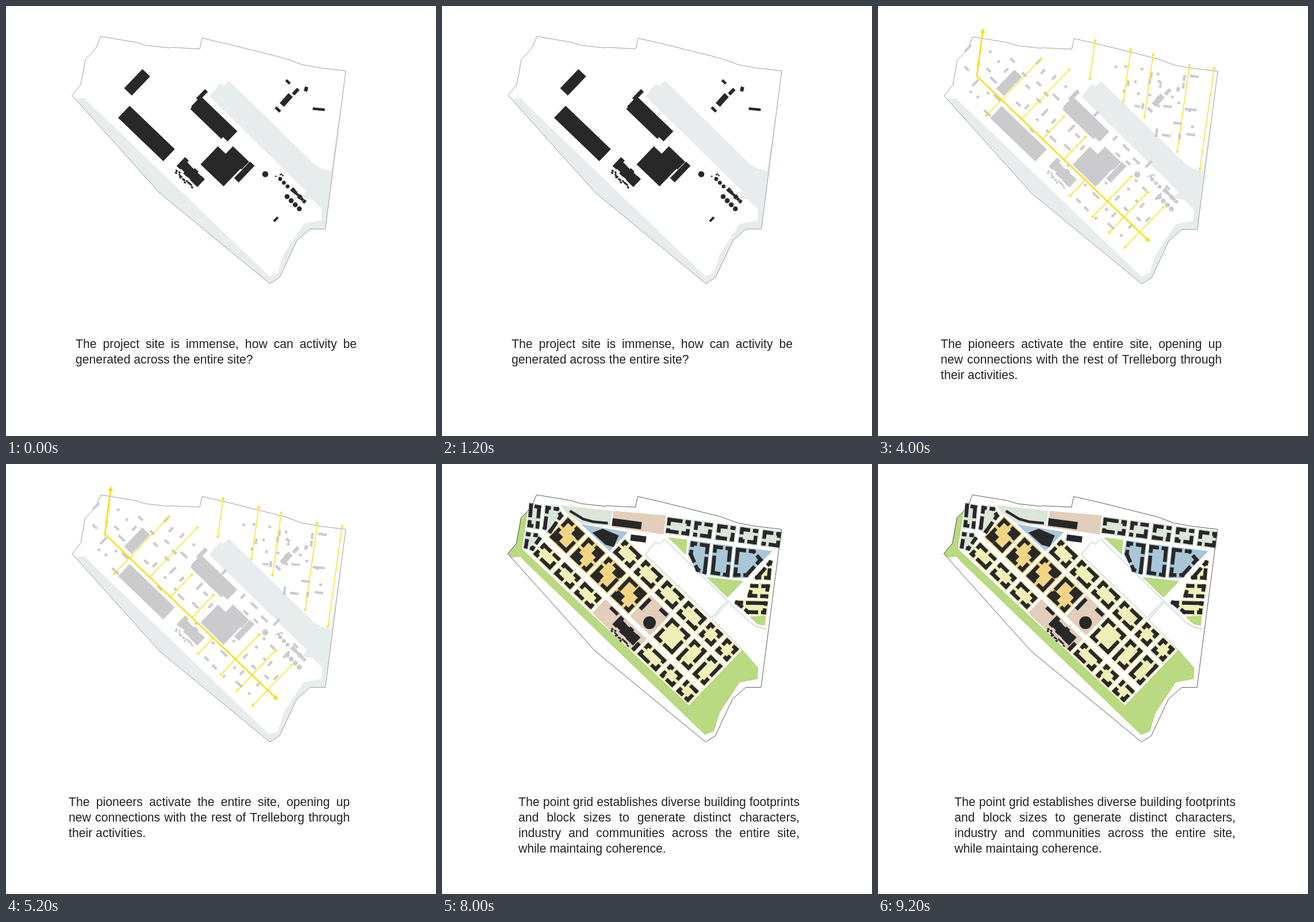
These frames come from a looping animation (748 px wide and 748 px high, 10000 ms). An HTML page with a canvas:

```html
<!DOCTYPE html>
<html lang="en">
<head>
<meta charset="utf-8">
<title>Site development</title>
<style>
html, body { margin: 0; width: 100%; height: 100%; overflow: hidden; background: #fff; }
canvas { display: block; width: 748px; height: 748px; }
</style>
</head>
<body>
<canvas id="stage" width="748" height="748"></canvas>
<script>
const ctx = document.getElementById('stage').getContext('2d');
const RAD = Math.PI / 180;
const AXIS = { x: 172, y: 121.5, deg: 43.83 };
const FLAT = { x: 394, y: 105, deg: 7.5 };
const INK = '#282828', GREY = '#cbcbcd', YELLOW = '#ffdc00';

let seed = 1;
function rand() {
  seed = (seed * 16807) % 2147483647;
  return seed / 2147483647;
}
const pick = list => list[Math.floor(rand() * list.length)];

function trace(pts) {
  ctx.beginPath();
  for (let i = 0; i < pts.length; i += 2) ctx.lineTo(pts[i], pts[i + 1]);
}

function poly(pts, fill, stroke, width = 0.8) {
  trace(pts);
  ctx.closePath();
  if (fill) { ctx.fillStyle = fill; ctx.fill(); }
  if (stroke) { ctx.strokeStyle = stroke; ctx.lineWidth = width; ctx.stroke(); }
}

function line(pts, color, width) {
  trace(pts);
  ctx.strokeStyle = color;
  ctx.lineWidth = width;
  ctx.stroke();
}

function within({ x, y, deg }, draw) {
  ctx.save();
  ctx.translate(x, y);
  ctx.rotate(deg * RAD);
  draw();
  ctx.restore();
}

function toStage({ x, y, deg }, u, v) {
  const c = Math.cos(deg * RAD), s = Math.sin(deg * RAD);
  return [x + u * c - v * s, y + u * s + v * c];
}

const rect = (x, y, w, h) => [x - w / 2, y - h / 2, x + w / 2, y - h / 2, x + w / 2, y + h / 2, x - w / 2, y + h / 2];
const box = (x, y, w, h, fill, deg = 0) => within({ x, y, deg }, () => poly(rect(0, 0, w, h), fill));

function disc(x, y, r, fill) {
  ctx.beginPath();
  ctx.arc(x, y, r, 0, 7);
  ctx.fillStyle = fill;
  ctx.fill();
}

// Terrain
const border = [165,53, 225,63, 243,68.5, 284,73, 286,72, 337,74.5, 341,56, 385,66, 485,91, 515,102,
  545,107.5, 591,113, 555.5,388, 529,388, 506,408, 476,472, 459,483, 267,325, 115,155.5, 130,137,
  138,93, 149,82, 157,72];
const shore = [115,155.5, 122,161.5, 137,160, 146,170, 458,470, 473,464, 483,432, 518,379, 549,373, 550,354];
const dock = [354,157, 372,135, 378,139, 388,130];
const inlet = [535,274, 547,282, 565,287];
const coast = [...shore, 533,337, 514,334, 523,323, ...dock, ...inlet, 583,168, ...border.slice(24, 38)];
const park = [...shore, 523,323, 430,420, 139,147, 149,82, 138,93, 130,137];

function terrain(water, edge) {
  if (water) poly(coast, water);
  poly(border, null, edge);
}

// Existing buildings, in the frame of the main axis
const halls = [[48.3,-30.7,18.5,46], [121.6,22.2,109,29], [189,-77.8,88,24.5], [184.6,-63.7,75,5], [145,-93,7,22],
  [254.4,-26,55.5,43.5], [265,-56.5,39,19], [290.8,-47.4,11,40]];
const huts = [[490.5,132,9,4.5,44], [522,144.5,6,8,15], [487.5,163.5,10,23,42], [504,149,6,13,44],
  [473,180,11,5,44], [544,179.5,21,4.5,5], [469.5,371,4,10,44]];

function factory(fill) {
  seed = 7;
  within(AXIS, () => {
    for (let i = 0; i < 6; i++) box(203 + i * 8.5, 16 + rand() * 4, 9, 14 + rand() * 8, fill);
    for (let i = 0; i < 14; i++) box(202 + i * 3 + rand() * 3, 31 + rand() * 7, 4, 3, fill);
  });
}

function beads(x, y, step, n, r, fill) {
  for (let i = 0; i < n; i++) disc(x + i * step, y + i * step, r, fill);
}

function existing(fill) {
  within(AXIS, () => halls.forEach(h => box(...h, fill)));
  factory(fill);
  for (const [x, y, w, h, deg] of huts) box(x, y, w, h, fill, deg);
  disc(451, 292.5, 5.3, fill);
  beads(477, 301, 6.4, 3, 3.4, fill);
  beads(489, 331.5, 7.1, 4, 4.3, fill);
  for (let i = 0; i < 6; i++) {
    box(499 + i * 4, 320 + i * 4, 4 + rand() * 3, 4 + rand() * 4, fill, 44);
    disc(468 + rand() * 22, 287 + rand() * 34, 1.4, fill);
  }
}

// Pioneers: a loose point grid along the two street directions
const tints = ['#7d6cab', '#4d5cab', '#82c3c1', '#d6668c', '#e6bb22'];
const pioneers = [];

function sow(frame, size, step, allowed) {
  for (let u = size[0]; u <= size[1]; u += step) for (let v = size[2]; v <= size[3]; v += step) {
    const pu = u + (rand() - 0.5) * step * 0.6, pv = v + (rand() - 0.5) * step * 0.6;
    const [x, y] = toStage(frame, pu, pv);
    const deg = frame.deg + (rand() < 0.5 ? 90 : 0);
    const cells = Array.from({ length: pick([1, 2, 2, 3]) }, () => pick(tints));
    if (allowed(pu, pv, x, y)) pioneers.push({ x, y, deg, cells });
  }
}

const built = [...halls, [224, 22, 50, 30]];
const isFree = (u, v) => built.every(([x, y, w, h]) => Math.abs(u - x) > w / 2 + 5 || Math.abs(v - y) > h / 2 + 5);
seed = 21;
sow(AXIS, [-40, 386, -90, 32], 24, (u, v, x, y) => x > 152 && y > 70 + (x - 165) * 0.15 && isFree(u, v));
sow(FLAT, [0, 176, 0, 122], 20, (u, v) => v < u * 0.85 + 18 && rand() > 0.12);

function scatter(plain) {
  for (const p of pioneers) within(p, () => p.cells.forEach((tint, i, { length }) =>
    box((i - (length - 1) / 2) * 5, 0, 5.1, 4.4, plain || tint)));
}

// Connections
const streets = [10, 59.4, 108, 158, 209.5, 261, 314.7, 354.3, 392];
const crossings = [[-101, 40], [-121], [-55.7], [-56], [39], [-62, 38.5], [-62, 38.5], [-62, 38.5]];
const northRoads = [[378,58,70], [440,73,95], [479,82.5,113], [542,101,155], [585,106,180]];

function head(x, y, fromX, fromY, size) {
  within({ x, y, deg: Math.atan2(y - fromY, x - fromX) / RAD }, () =>
    poly([size * 0.35, 0, -size * 0.7, -size * 0.55, -size * 0.7, size * 0.55], YELLOW));
}

function arrow(a, b, both) {
  line([...a, ...b], YELLOW, 1.3);
  head(...b, ...a, 4.5);
  if (both) head(...a, ...b, 4.5);
}

function connections() {
  within(AXIS, () => crossings.forEach(([end, start], i) =>
    arrow([streets[i + 1], start ?? 0], [streets[i + 1], end], start !== undefined)));
  for (const [x, y, len] of northRoads) arrow([x, y], [x - len * 0.14, y + len * 0.99], true);
  line([182.5,41, 172,121.5, 471,408], YELLOW, 2.6);
  head(182.5, 41, 172, 121.5, 8);
  head(471, 408, 172, 121.5, 8);
}

// City blocks: a broken ring of buildings inside each parcel
const shade = { d: '#062b40', m: '#4f6a72', g: '#929ea4', l: '#bfc7c6', e: '#d8dad8' };
const lemon = '#f0efb8', sage = '#dbe5d8', sky = '#a9c6d6', clay = '#e3cdbb', grass = '#b9da80', amber = '#f2d583';
let final = false;
const tone = c => final ? INK : shade[c];

function wing(p, q, from, to, c, thick) {
  const at = t => [p[0] + (q[0] - p[0]) * t, p[1] + (q[1] - p[1]) * t];
  const hatched = c === 'e' && !final;
  ctx.setLineDash(hatched ? [1.8, 0.9] : []);
  line([...at(from), ...at(to)], tone(c), hatched ? thick - 2 : thick);
  ctx.setLineDash([]);
}

function inset(pts, by) {
  const axis = k => pts.filter((_, i) => i % 2 === k);
  const spans = [0, 1].map(k => [Math.min(...axis(k)), Math.max(...axis(k))]);
  return pts.map((p, i) => {
    const [lo, hi] = spans[i % 2], mid = (lo + hi) / 2;
    return mid + (p - mid) * (1 - 2 * by / (hi - lo));
  });
}

function block(pts, ground, tones, thick = 6.5) {
  if (final) poly(pts, ground);
  const ring = inset(pts, thick / 2 + 2.2), n = ring.length;
  for (let i = 0; i < n; i += 2) {
    const p = [ring[i], ring[i + 1]], q = [ring[(i + 2) % n], ring[(i + 3) % n]];
    const len = Math.hypot(q[0] - p[0], q[1] - p[1]);
    const cut = 0.25 + rand() * 0.5, gap = 2.5 / len, over = thick / 2 / len;
    wing(p, q, -over, cut - gap, pick(tones), thick);
    wing(p, q, cut + gap, 1 + over, pick(tones), thick);
  }
}

// One entry per column between two streets; '-' is left open
const rows = [
  [-97, -62, '- - mge dde dmd mml m m'],
  [-56, -5, 'lem gem lem mle - dle lle gle'],
  [4, 36, 'lle d d - - mlg mme lle']
];

function gridCity() {
  if (final) {
    const [a, b, c] = streets.slice(3);
    poly(rect((b + c) / 2, -30.5, c - b - 3, 51), clay);
    poly(rect((a + c) / 2, 20, c - a - 3, 33), clay);
  }
  rows.forEach(([top, bottom, tones], r) => tones.split(' ').forEach((t, k) => {
    if (t === '-') return;
    const x = (streets[k] + streets[k + 1]) / 2, w = streets[k + 1] - streets[k] - 4.5;
    const y = (top + bottom) / 2, isAmber = r === 1 && k < 4;
    block(rect(x, y, w, bottom - top), isAmber ? amber : lemon, t);
    if (!isAmber) return;
    box(x - 11, y + 15, 16, 16, tone(t[0]));
    box(x + 11, y - 15, 16, 16, tone(t[2] === 'e' ? 'g' : t[2]));
  }));
}

const quarters = [
  [sage, 'lme', [152,66, 175,70, 170,114, 147,111]],
  [sage, 'mgl', [180,70, 204,73, 213,88, 187,122, 174,114]],
  [sage, 'lle', [146,116, 167,119, 175,128, 158,152, 141,147]],
  [sky, 'lge', [432,132, 468,137, 461,193, 444,188, 428,155]],
  [sky, 'mge', [472,138, 507,142, 501,198, 466,193]],
  [sky, 'mlg', [511,143, 545,147, 560,165, 530,198, 505,198]],
  [lemon, 'dle', [577,165, 573,203, 543,202]],
  [lemon, 'dme', [536,206, 573,207, 569,235, 530,233]],
  [lemon, 'dmg', [508,235, 569,237, 566,263, 532,262]]
];
const greens = [
  [sage, [206,71, 297,81, 293,108, 243,103, 216,84]],
  [clay, [299,81, 390,89, 386,122, 295,109]],
  [sky, [242,104, 324,118, 292,151]],
  [sky, [545,147, 575,151, 558,169]],
  [grass, [393,127, 427,131, 425,158]],
  [grass, [460,196, 525,203, 497,232]],
  [grass, [535,265, 564,263, 562,281, 549,278]]
];

function city(isFinal) {
  final = isFinal;
  if (final) for (const [fill, pts] of greens) poly(pts, fill);
  seed = 5;
  within(AXIS, gridCity);
  within(FLAT, () => {
    for (let i = 0; i < 5; i++) block(rect(i ? 21 + i * 40 : 18, 1, i ? 36 : 45, 31), sage, i % 2 ? 'lme' : 'llm');
  });
  for (const [ground, tones, pts] of quarters) block(pts, ground, tones);
  box(322, 103.5, 51, 13, tone('m'), FLAT.deg);
  box(342, 129, 27, 11, tone('m'), FLAT.deg);
  poly([262,119, 280,112, 308,124, 299,144, 285,140], tone('g'));
  line([223,81, 246,95, 264,100, 289,102.5], tone('l'), 4.5);
  disc(361.5, 275.5, 11, tone('d'));
  box(354, 243, 7, 25, tone('m'), AXIS.deg);
  box(386, 257, 17, 7, tone('d'), AXIS.deg);
  box(300, 255, 18, 6, tone('m'), AXIS.deg);
  box(338, 317, 7, 17, tone('m'), AXIS.deg);
  factory(final ? INK : GREY);
}

function basins() {
  const edge = '#7fa5a8';
  poly([...dock, 497,237, 469,267], null, edge);
  line([523,323, 471,270, 499,239, ...inlet], edge, 0.8);
}

// Captions
const captions = [
  [121, 'The project site is immense, how can activity be', 'generated across the entire site?'],
  [97, 'Pioneers colonize the entire site, scattered like', 'confetti the pioneers establish a point grid - the',
    'clues for the city to come...'],
  [109, 'The pioneers activate the entire site, opening up', 'new connections with the rest of Trelleborg through',
    'their activities.'],
  [120.5, 'Additional development occurs gradually,', 'complementing and strengthening the existing urban',
    'structure. Development does not ocur in phases,', 'but considers the entire project site as a whole that',
    'matures over time.'],
  [133, 'The point grid establishes diverse building footprints', 'and block sizes to generate distinct characters,',
    'industry and communities across the entire site,', 'while maintaing coherence.']
];

function caption([left, ...lines]) {
  ctx.font = '21.2px "Liberation Sans", Arial, sans-serif';
  ctx.fillStyle = '#222';
  lines.forEach((text, i) => {
    const y = 595.2 + i * 26.8;
    if (i === lines.length - 1) return ctx.fillText(text, left, y);
    const words = text.split(' ');
    const widths = words.map(w => ctx.measureText(w).width);
    const gap = (489 - widths.reduce((a, b) => a + b)) / (words.length - 1);
    let x = left;
    words.forEach((w, k) => { ctx.fillText(w, x, y); x += widths[k] + gap; });
  });
}

function plan(fill) {
  terrain('#e6edec', '#858585');
  existing(fill);
}

const scenes = [
  () => plan(INK),
  () => { plan(GREY); scatter(); },
  () => { plan(GREY); scatter(GREY); connections(); },
  () => {
    terrain('#e6eaeb', '#444');
    line([468,270, 497,238], '#fff', 2.5);
    city(false);
  },
  () => {
    poly(park, grass, '#8fb45f', 0.6);
    basins();
    city(true);
    terrain(null, '#333');
  }
];

let shown = -1;
function frame() {
  const n = Math.floor(performance.now() % 10000 / 2000);
  if (n !== shown) {
    shown = n;
    ctx.fillStyle = '#fff';
    ctx.fillRect(0, 0, 748, 748);
    ctx.save();
    ctx.translate(n > 2 ? -0.5 : 0, n > 1 ? 0.6 : 0);
    scenes[n]();
    ctx.restore();
    caption(captions[n]);
  }
  requestAnimationFrame(frame);
}
frame();
</script>
</body>
</html>
```
